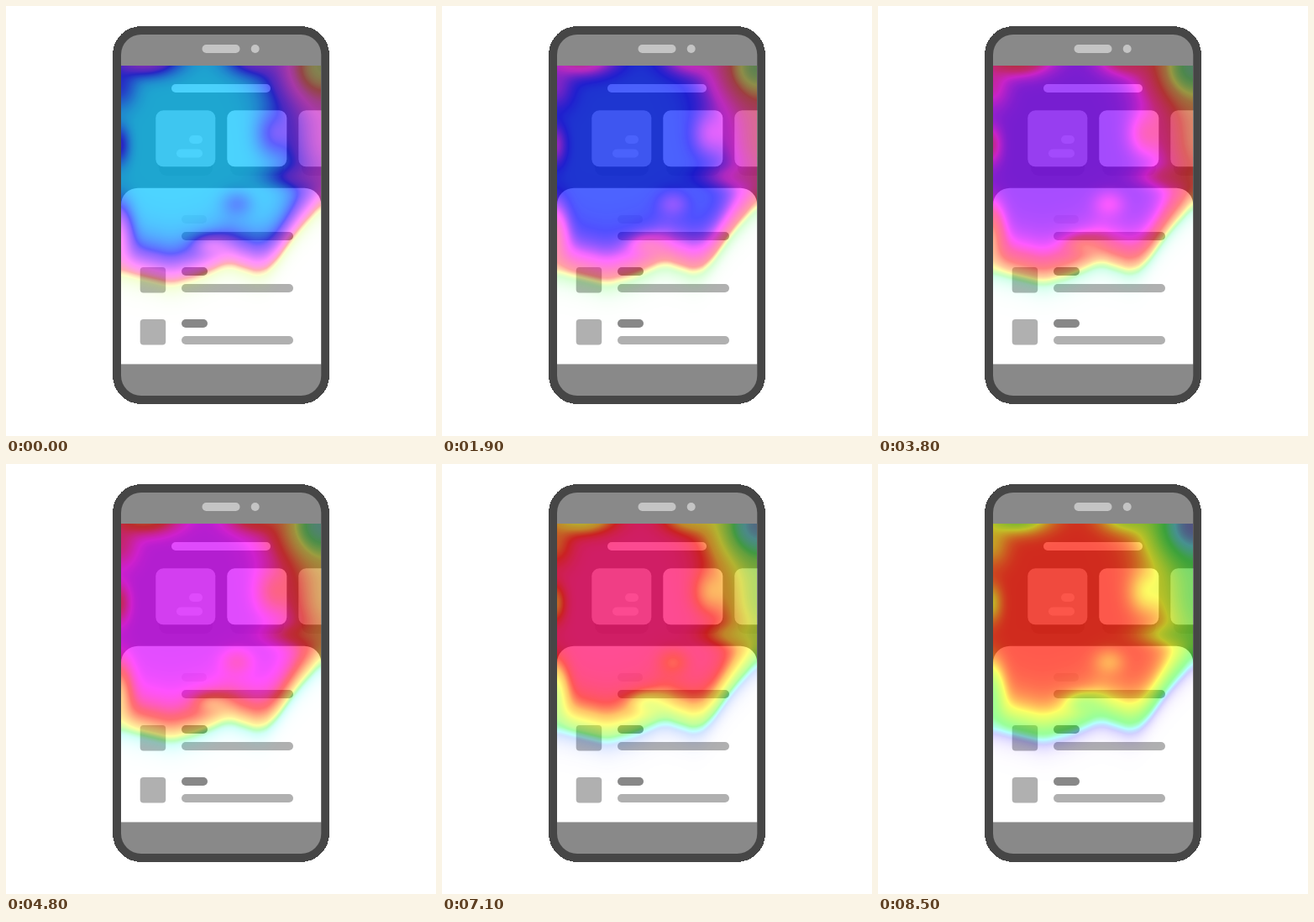
An HTML page with a canvas for the animation above (8.6 s loop, 512x512 px).

```html
<!DOCTYPE html>
<html lang="en">
<head>
<meta charset="utf-8">
<title>Phone heat map</title>
<style>
  html, body { margin: 0; width: 100%; height: 100%; overflow: hidden; background: #fff; }
  svg, canvas { position: absolute; display: block; }
  svg { left: 0; top: 0; }
  canvas { left: 137px; top: 71px; }
</style>
</head>
<body>
<svg width="512" height="512" viewBox="0 0 512 512">
  <defs>
    <clipPath id="screen"><path d="M137 71H375.300V426.400H137Z"/></clipPath>
  </defs>
  <rect x="127" y="24" width="258" height="450" rx="34" fill="#464646" shape-rendering="crispEdges"/>
  <rect x="137" y="34" width="238.300" height="430" rx="24" fill="#898989"/>
  <rect x="233.500" y="46" width="45" height="10" rx="5" fill="#c4c4c4"/>
  <circle cx="296.700" cy="51" r="5" fill="#c4c4c4"/>
  <g clip-path="url(#screen)">
    <path d="M137 71H376V427H137Z" fill="#646464"/>
    <rect x="197" y="93" width="118" height="10" rx="5" fill="#f5f5f5"/>
    <g fill="#585858">
      <rect x="182" y="180" width="64" height="22" rx="9"/>
      <rect x="267" y="180" width="64" height="22" rx="9"/>
      <rect x="352" y="180" width="64" height="22" rx="9"/>
    </g>
    <rect x="178.300" y="124.300" width="71" height="67" rx="9" fill="#cdcdcd"/>
    <rect x="263.300" y="124.300" width="71" height="67" rx="9" fill="#f8f8f8"/>
    <rect x="348.300" y="124.300" width="71" height="67" rx="9" fill="#bcbcbc"/>
    <rect x="218" y="154" width="16" height="10" rx="5" fill="#f4f4f4"/>
    <rect x="203" y="170.500" width="31" height="10" rx="5" fill="#f4f4f4"/>
    <rect x="137" y="216.700" width="238.300" height="240" rx="20" fill="#fff"/>
    <rect x="209" y="249" width="30" height="10" rx="5" fill="#e8e8e8"/>
    <rect x="209" y="269" width="133" height="10" rx="5" fill="#989898"/>
    <g id="row">
      <rect x="159.700" y="311" width="30.500" height="30.500" rx="4" fill="#b0b0b0"/>
      <rect x="209" y="311" width="31" height="10" rx="5" fill="#888"/>
      <rect x="209" y="331" width="133" height="10" rx="5" fill="#b0b0b0"/>
    </g>
    <use href="#row" y="62"/>
  </g>
</svg>
<canvas id="heat" width="238" height="312"></canvas>
<script>
const STEP = 100, STEPS = 86, START_HUE = 194, HUE_PER_STEP = 2;
const LEFT = 137, TOP = 71;

// Height at which the heat has dropped to one half.
const edge = [[137, 312], [196, 326], [228, 318], [264, 302], [302, 314], [318, 304], [348, 262], [376, 232]];

const coolSpots = [
  { x: 376, y: 71, rx: 48, ry: 48, depth: .72 },
  { x: 382, y: 160, rx: 40, ry: 60, depth: .36 },
  { x: 345, y: 203, rx: 35, ry: 12, depth: .1 },
  { x: 318, y: 152, rx: 20, ry: 25, depth: .1 },
  { x: 295, y: 62, rx: 30, ry: 18, depth: .2 },
  { x: 165, y: 62, rx: 35, ry: 18, depth: .3 },
  { x: 134, y: 95, rx: 20, ry: 25, depth: .1 },
  { x: 134, y: 165, rx: 12, ry: 22, depth: .13 },
  { x: 132, y: 275, rx: 16, ry: 35, depth: .35 },
  { x: 244, y: 284, rx: 20, ry: 12, depth: .18 },
  { x: 275, y: 235, rx: 18, ry: 15, depth: .06 }
];

const hueOfHeat = [[0, 255], [.25, 240], [.55, 120], [.85, 60], [1, 0]];

const clamp = v => Math.min(1, Math.max(0, v));

// Linear interpolation along a list of points.
function along(points, x) {
  const i = Math.max(1, points.findIndex(p => p[0] >= x));
  const [[x0, y0], [x1, y1]] = points.slice(i - 1, i + 1);
  return y0 + (y1 - y0) * (x - x0) / (x1 - x0);
}

function edgeAt(x) {
  let sum = 0;
  for (let shift = -8; shift <= 8; shift += 4) {
    sum += along(edge, Math.min(376, Math.max(137, x + shift)));
  }
  return sum / 5;
}

function heatAt(x, y, edgeY) {
  const below = y - edgeY;
  const falloff = 1 / (1 + Math.exp(below / (below < 0 ? 15 : 9)));
  return coolSpots.reduce((heat, s) =>
    heat * (1 - s.depth * Math.exp(-(((x - s.x) / s.rx) ** 2) - ((y - s.y) / s.ry) ** 2)), falloff);
}

const canvas = document.getElementById('heat');
const ctx = canvas.getContext('2d');
const { width, height } = canvas;
const image = ctx.createImageData(width, height);
const hues = new Float32Array(width * height);

for (let x = 0; x < width; x++) {
  const edgeY = edgeAt(x + LEFT);
  for (let y = 0; y < height; y++) {
    const heat = heatAt(x + LEFT, y + TOP, edgeY);
    const i = y * width + x;
    hues[i] = along(hueOfHeat, heat);
    image.data[i * 4 + 3] = 255 * .7 * heat;
  }
}

const channel = (hue, shift) =>
  255 * clamp(Math.abs((hue / 60 + shift) % 6 - 3) - 1);

function paint(step) {
  const turn = START_HUE + step * HUE_PER_STEP;
  for (let i = 0; i < hues.length; i++) {
    const hue = hues[i] + turn;
    image.data[i * 4] = channel(hue, 0);
    image.data[i * 4 + 1] = channel(hue, 4);
    image.data[i * 4 + 2] = channel(hue, 2);
  }
  ctx.putImageData(image, 0, 0);
}

let shown = -1;
const start = performance.now();
function tick() {
  const step = Math.floor((performance.now() - start) / STEP) % STEPS;
  if (step !== shown) paint(shown = step);
  requestAnimationFrame(tick);
}
tick();
</script>
</body>
</html>
```
